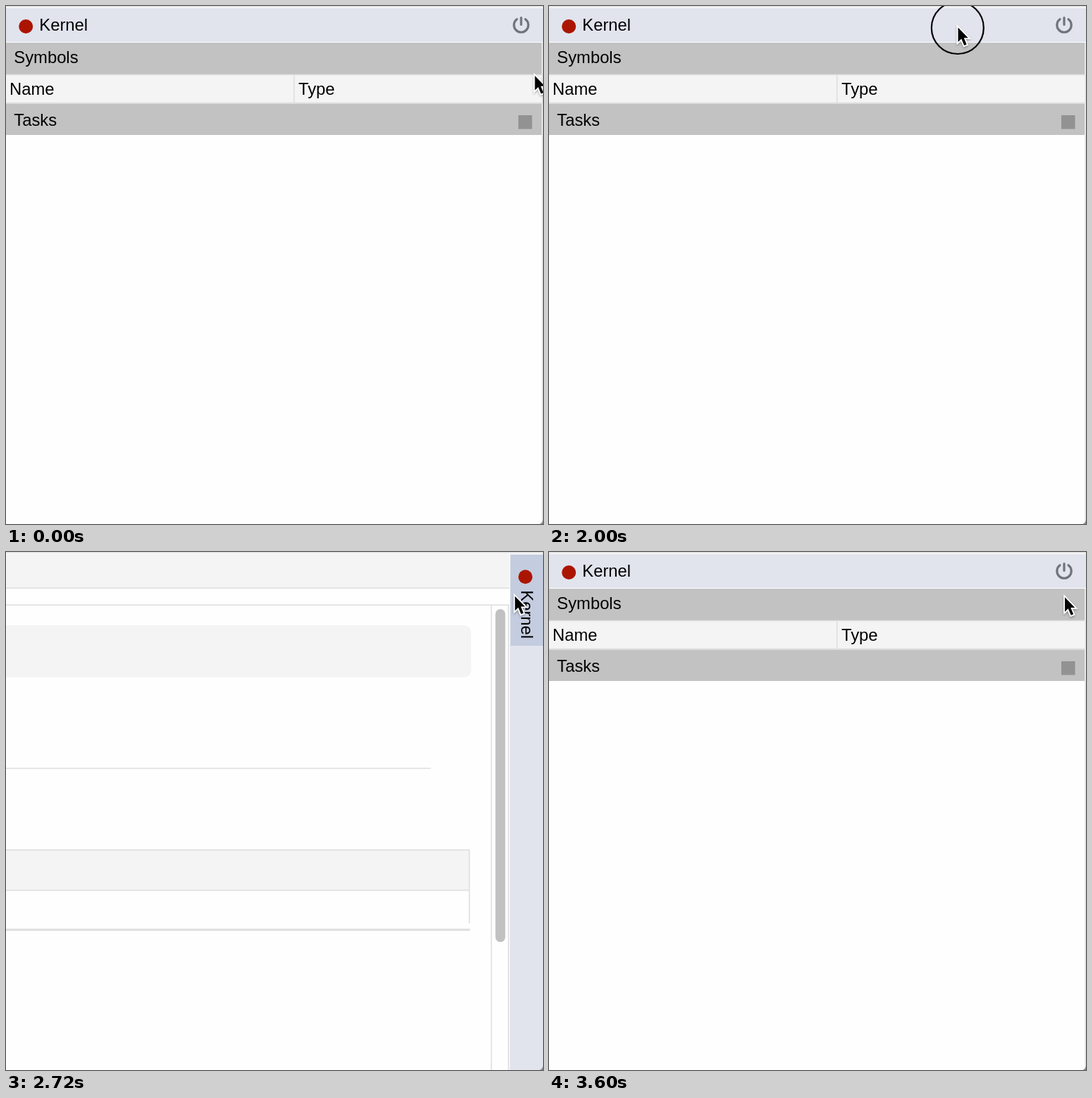
An HTML page for the animation above (5760 ms loop, 762 by 735 pixels).

```html
<!DOCTYPE html>
<html lang="en">
<head>
<meta charset="utf-8">
<title>Kernel panel</title>
<style>
  html, body { margin: 0; width: 100%; height: 100%; overflow: hidden; background: #fefefe; }
  svg { display: block; }
  text { font: 23.8px "Liberation Sans", Arial, sans-serif; fill: #000; }
  .line { fill: none; stroke: #dedede; stroke-width: 1.6; }
  .bar { fill: #c2c2c2; }
  .pale { fill: #f4f4f4; }
  .head { fill: #e1e4ed; }
  .dot { fill: #ab1500; }
</style>
</head>
<body>
<svg width="762" height="735" viewBox="0 0 762 735">
  <defs>
    <filter id="shadow" x="-50%" y="-50%" width="200%" height="200%">
      <feDropShadow dx="0" dy="1.5" stdDeviation="1.5" flood-opacity=".35"/>
    </filter>
    <path id="arrow" d="M0 0V20.5L4.7 16L8.7 25.4L12.1 24L8.2 14.7H14.2Z"/>
  </defs>

  <path class="line" d="M0 1H762"/>

  <g id="open">
    <rect class="head" y="3" width="762" height="48"/>
    <circle class="dot" cx="28.2" cy="29" r="10"/>
    <text x="47.3" y="35">Kernel</text>
    <g fill="none" stroke="#70737d" stroke-width="3.2" stroke-linecap="round">
      <path d="M725 18.8A10.2 10.2 0 1 0 737 18.8M731 16.5V26.5"/>
    </g>
    <rect class="bar" y="52" width="760" height="45"/>
    <text x="11.3" y="81">Symbols</text>
    <rect class="pale" y="98" width="760" height="39"/>
    <path class="line" d="M0 97.5H760M0 137.5H760M408.7 98V137M761.2 52V735"/>
    <text x="5" y="126.3">Name</text>
    <text x="415" y="126.3">Type</text>
    <rect class="bar" y="138.5" width="760" height="44.5"/>
    <text x="11.3" y="169.5">Tasks</text>
    <rect x="727" y="155" width="19.5" height="19.5" fill="#929292"/>
  </g>

  <g id="closed">
    <rect class="pale" y="3" width="714" height="48"/>
    <rect class="pale" x="-20" y="104" width="680" height="74" rx="10"/>
    <rect class="pale" y="423" width="657" height="57"/>
    <path class="line" d="M0 51.3H714M0 75.3H714M688.7 75V735M713 75V735M0 307H602.5M0 422.7H657.5V527M0 480H657"/>
    <path class="line" stroke-width="3" style="stroke-width:3" d="M0 536H658.5"/>
    <rect x="694.5" y="81" width="14" height="472.5" rx="7" fill="#c1c1c1"/>
    <rect class="head" x="715" y="3" width="47" height="732"/>
    <rect id="hover" x="716" y="4" width="46" height="129" fill="#c4ccdf"/>
    <circle class="dot" cx="737" cy="35.2" r="10"/>
    <text transform="translate(731.2 54.3) rotate(90)">Kernel</text>
  </g>

  <path d="M762 729V735H757Q761 734 762 729Z" fill="#8c8c8c"/>

  <g id="cursor">
    <circle id="click" cx="-.7" cy=".5" r="37" fill="none" stroke="#000" stroke-width="2.2"/>
    <g filter="url(#shadow)">
      <use href="#arrow" fill="#fff" stroke="#fff" stroke-width="3.6"/>
    </g>
    <use href="#arrow"/>
  </g>
</svg>
<script>
  const LOOP = 5760, STEP = 80;
  const $ = id => document.getElementById(id);
  const show = (id, on) => { $(id).style.display = on ? "" : "none"; };

  const smooth = p => p * p * (3 - 2 * p);
  const rise = p => p ** 1.4;
  const settle = p => 1 - (1 - p) ** 2;
  const hold = p => p < 1 ? 0 : 1;

  // Cursor stops: time, x, y, easing used to get there
  const stops = [
    [0, 750.5, 99],
    [560, 584, 35, smooth],
    [800, 584, 35, hold],
    [1040, 582, 30.5, smooth],
    [2000, 580.5, 30.5, hold],
    [2080, 580.5, 30.5, hold],
    [2480, 671, 54.3, rise],
    [2880, 732, 64.3, settle],
    [LOOP, 732, 64.3, hold]
  ];

  function cursorAt(t) {
    const i = stops.findIndex(s => s[0] > t);
    const [t0, x0, y0] = stops[i - 1], [t1, x1, y1, ease] = stops[i];
    const p = ease((t - t0) / (t1 - t0));
    return [x0 + (x1 - x0) * p, y0 + (y1 - y0) * p];
  }

  function draw(now) {
    const t = Math.floor(now % LOOP / STEP) * STEP;
    const [x, y] = cursorAt(t);
    const closed = t >= 2080 && t < 3200;
    show("open", !closed);
    show("closed", closed);
    show("hover", x >= 716);
    show("click", t === 2000 || t === 3040);
    $("cursor").setAttribute("transform", `translate(${x} ${y})`);
  }

  let start;
  function tick(now) {
    start ??= now;
    draw(now - start);
    requestAnimationFrame(tick);
  }
  draw(0);
  requestAnimationFrame(tick);
</script>
</body>
</html>
```
